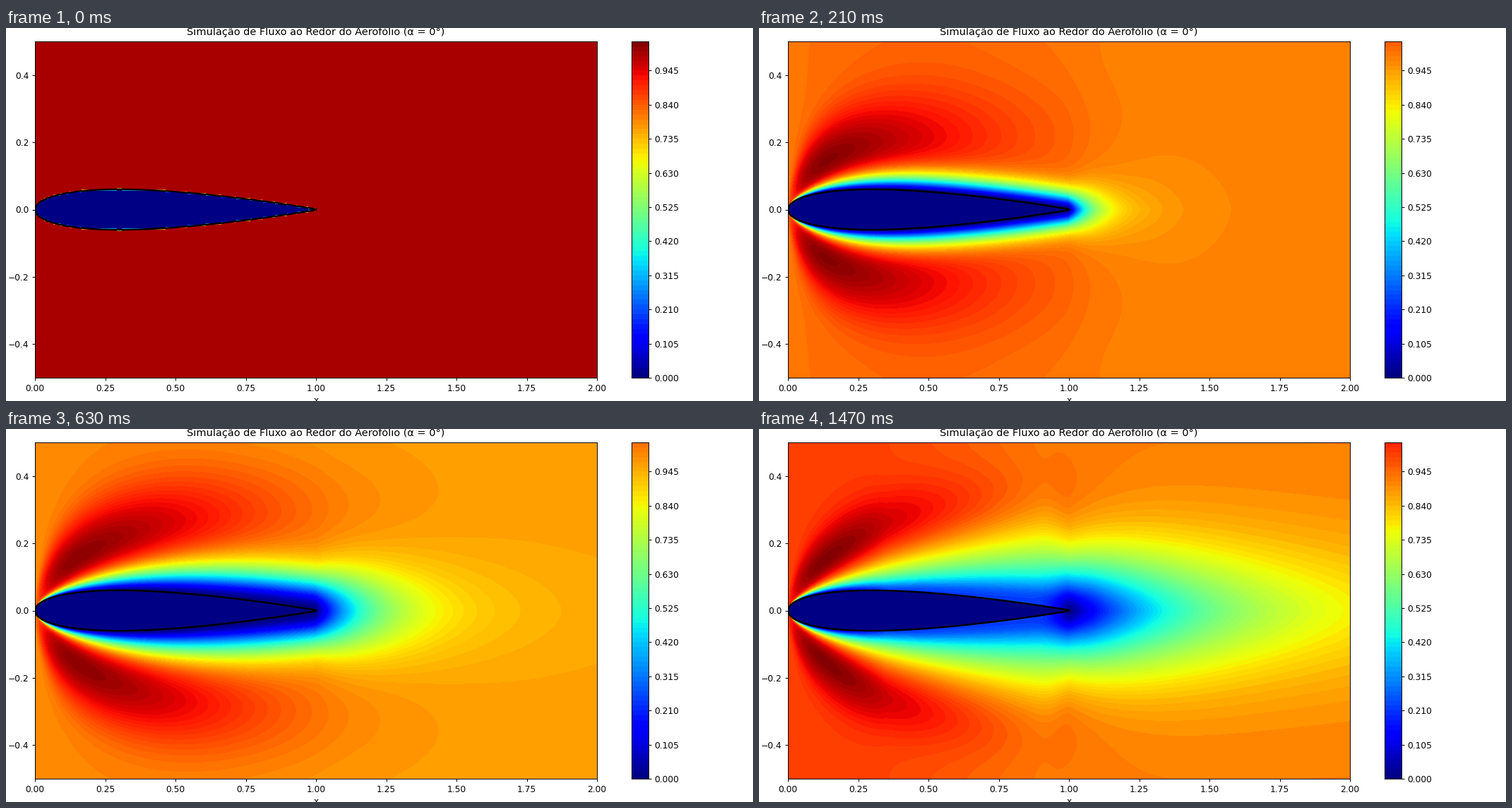
Write a matplotlib script that moves like this. It is 1058 px wide and 529 px high and loops after 1500 ms.

```python
import numpy as np
import matplotlib.pyplot as plt
from matplotlib.animation import FuncAnimation

W, H, DPI = 1058, 529, 64
K = 1058 / 12 / DPI          # point scale of a 12 inch wide figure
FRAMES, INTERVAL = 50, 30
STEP = 0.015                 # contour spacing

plt.rcParams.update({
    "font.family": "DejaVu Sans", "font.size": 10 * K,
    "axes.linewidth": 0.8 * K, "axes.titlesize": 11.8 * K,
    "axes.titlepad": 7 * K, "axes.labelpad": 4 * K,
})
for axis in ("xtick", "ytick"):
    plt.rcParams.update({f"{axis}.major.width": 0.8 * K,
                         f"{axis}.major.size": 3.5 * K,
                         f"{axis}.major.pad": 3.5 * K})


def thickness(x):
    """Half thickness of a NACA 0012 section."""
    return 0.6 * (0.2969 * np.sqrt(x) - 0.1260 * x - 0.3516 * x**2
                  + 0.2843 * x**3 - 0.1015 * x**4)


def settle(n, tau):
    return 1 - np.exp(-n / tau)


def gauss(d, width):
    return np.exp(-(d / width)**2)


# Pixel grid of the upper half; the flow is symmetric about y = 0
COLS, ROWS = 796, 477
x = ((np.arange(COLS) + 0.5) * 2 / COLS)[None, :]
y = (np.arange(ROWS // 2 + 1) / ROWS)[:, None]
chord_x = np.minimum(x, 1)
behind = np.maximum(x - 1, 0)
surface = np.where(x <= 1, thickness(chord_x), 0)
solid = (x <= 1) & (y < surface)
gap = np.maximum(y - surface, 0)


def first_step():
    """Uniform stream with a staircase wall one grid cell thick."""
    cell = 0.005
    wall = np.floor(surface / cell) * cell
    return np.where(x <= 1, np.clip((y - wall) / cell, 0, 1), 1.0)


def peak_speed(n):
    return 1.035 + 0.285 * (1 - np.exp(-0.42 * n**0.77)) - 5.7e-5 * n**2


def outer_flow(n):
    # fast lobe leaving the nose along a curved ridge
    ceiling = 0.13 + 0.25 * settle(n, 15)
    ridge = 0.4 * np.sqrt(x)
    ridge = ridge / (1 + (ridge / ceiling)**4)**0.25
    width = 0.2 * settle(n, 3) * (1 - 0.006 * n) * np.sqrt(x / (x + 0.15))
    reach = 0.8 * settle(n, 5)
    along = settle(x, 0.04) * np.exp(-(x / reach)**(1.5 + 0.03 * n))
    lobe = 1.04 * (peak_speed(n) - 1) * along * gauss(y - ridge, width)

    # early displacement of the stream above and behind the foil
    broad = (0.07 * np.exp(-n / 9) * settle(x, 0.1)
             * gauss(x - 0.5, 0.45) * gauss(y, 0.8))
    r = np.sqrt((x - 1.07 - 0.03 * n)**2 + y**2 + 0.0009)
    tail = (0.07 * np.exp(-n / 10) * np.exp(-r / (0.08 + 0.04 * n))
            / (1 + np.exp(-(x - 1.03) / 0.03)))

    # slow loss of momentum downstream
    s = np.clip(x - 0.15, 0, 1)
    loss = ((0.001 * n + 2e-5 * n**2) * s * s * (3 - 2 * s)
            * (0.85 + 0.3 * gauss(y, 0.28)))
    return 1 + lobe + broad - tail - loss


def speed_field(n):
    if n == 0:
        return first_step()
    late = max(n - 33, 0) / 16
    slip = np.clip((x - 0.05) / 0.3, 0, 1)
    layer = 0.02 + 0.0041 * n
    wake = 0.03 + 0.0075 * n + 4e-5 * n**2

    width = layer * np.tanh(0.17 * chord_x / layer) + 0.05 * settle(behind, 0.3)
    power = (1.25 + (0.2 + 0.02 * n - 0.7 * late) * chord_x
             - 0.5 * late * slip * (1 - gauss(chord_x - 1.02, 0.07)))
    deficit = np.exp(-behind / wake) * np.exp(-(gap / width)**power)
    speed = outer_flow(n) * (1 - deficit)

    # late backflow along the wall, vanishing at the trailing edge
    backflow = (0.23 * late * slip * gauss(np.maximum(x - 1.02, 0), 0.05)
                * (1 - gauss(np.hypot(x - 1.02, y), 0.07)))
    return np.where(solid, 0, np.hypot(speed, backflow * deficit))


def banded(values):
    return (np.floor(values / STEP) + 0.5) * STEP


def pixel_axes(left, top, right, bottom):
    return fig.add_axes([left / W, 1 - bottom / H,
                         (right - left) / W, (bottom - top) / H])


fig = plt.figure(figsize=(W / DPI, H / DPI), dpi=DPI, facecolor="white")
ax = pixel_axes(41, 19, 837, 496)
cax = pixel_axes(886, 19, 910, 496)

image_style = dict(cmap="jet", aspect="auto", origin="lower",
                   interpolation="nearest")
flow = ax.imshow(np.zeros((ROWS, COLS)), extent=[0, 2, -0.5, 0.5],
                 **image_style)
bands = (np.arange(69) + 0.5)[:, None] * STEP
bar = cax.imshow(bands, extent=[0, 1, 0, 69 * STEP], **image_style)

foil_x = np.linspace(0, 1, 200)
foil_y = thickness(foil_x)
ax.plot(np.r_[foil_x, foil_x[::-1]], np.r_[foil_y, -foil_y[::-1]],
        color="black", lw=2 * K)

ax.set(xlim=(0, 2), ylim=(-0.5, 0.5), xlabel="x",
       xticks=np.arange(9) * 0.25, yticks=np.arange(-2, 3) / 5)
ax.xaxis.set_major_formatter("{x:.2f}")
ax.set_title("Simulação de Fluxo ao Redor do Aerofólio (α = 0°)", y=1.0)

ticks = np.arange(10) * 7 * STEP
cax.set_xticks([])
cax.yaxis.tick_right()
cax.set_yticks(ticks, [f"{t:.3f}" for t in ticks])


def update(n):
    vmax = np.ceil(peak_speed(n) / STEP - 0.01) * STEP
    half = banded(np.clip(speed_field(n), 0, vmax - 0.002))
    flow.set_data(np.vstack([half[:0:-1], half]))
    flow.set_clim(0, vmax)
    bar.set_clim(0, vmax)
    return flow, bar


anim = FuncAnimation(fig, update, frames=FRAMES, interval=INTERVAL,
                     repeat=True, repeat_delay=0, blit=False)
plt.show()
```
